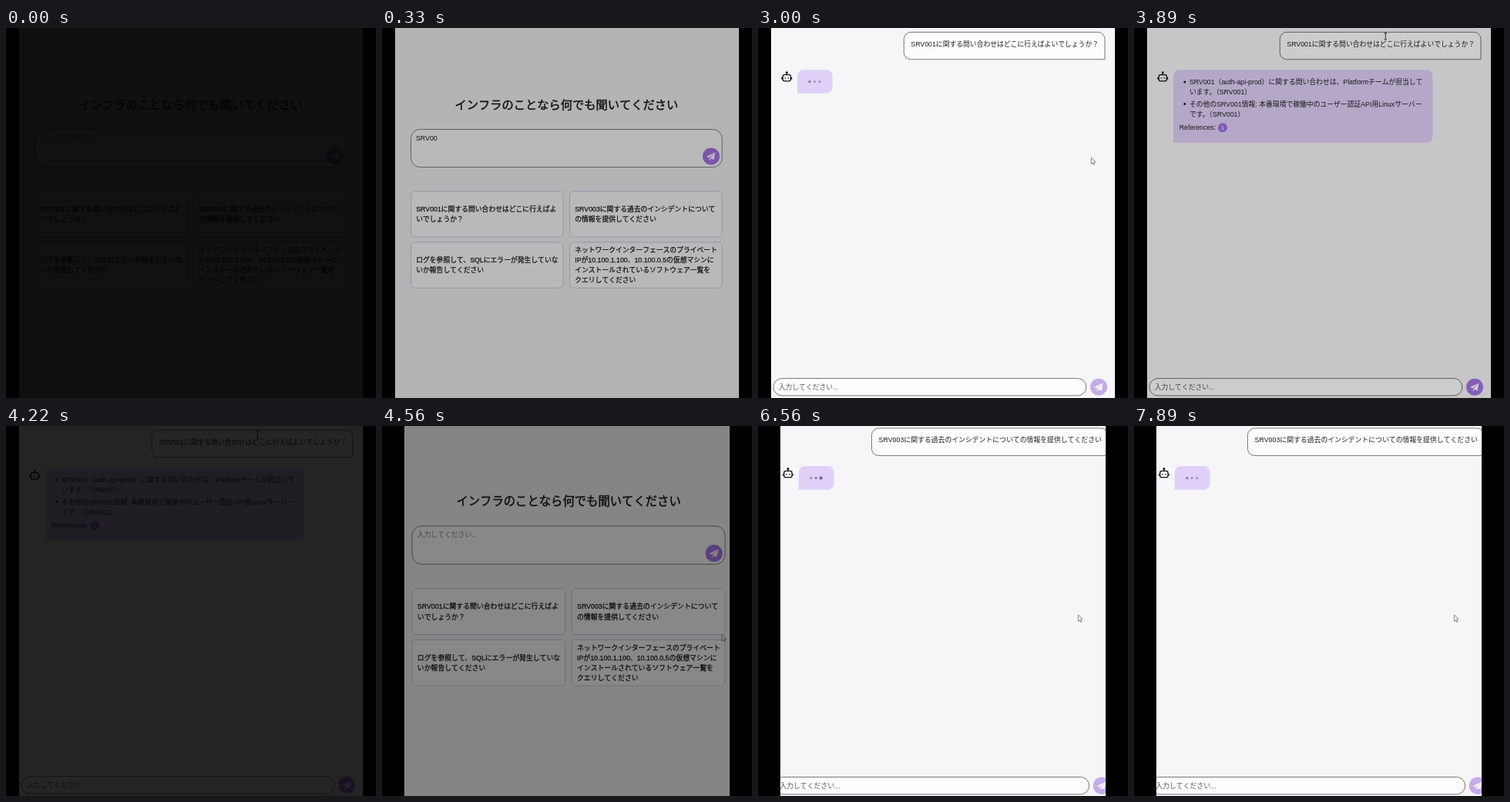
An HTML page with a canvas for the animation above (8 s loop, 480 px wide and 480 px high).

```html
<!DOCTYPE html>
<html lang="ja">
<head>
<meta charset="utf-8">
<title>Infra chat</title>
<style>
html, body { margin: 0; width: 100%; height: 100%; overflow: hidden; background: #000; }
canvas { display: block; width: 480px; height: 480px; }
</style>
</head>
<body>
<canvas id="stage"></canvas>
<script>
const LOOP = 8000, EM = 8.8;
const FAMILY = '"Liberation Sans", "Noto Sans CJK JP", "Noto Sans CJK", sans-serif';
const BG = '#f6f6f8', PAPER = '#fdfdfd', INK = '#1c1c22', EDGE = '#55555b';
const LILAC = '#e0d0f7', PURPLE = '#a874ea', PALE = '#c5abea';

const Q1 = 'SRV001に関する問い合わせはどこに行えばよいでしょうか？';
const Q2 = 'SRV003に関する過去のインシデントについての情報を提供してください';
const HINT = '入力してください...';
const CARDS = [
  [37.5, 212, ['SRV001に関する問い合わせはどこに行えばよ', 'いでしょうか？']],
  [243.5, 212, ['SRV003に関する過去のインシデントについて', 'の情報を提供してください']],
  [37.5, 278, ['ログを参照して、SQLにエラーが発生していな', 'いか報告してください']],
  [243.5, 278, ['ネットワークインターフェースのプライベート', 'IPが10.100.1.100、10.100.0.5の仮想マシンに',
    'インストールされているソフトウェア一覧を', 'クエリしてください']]
];
// Each line: baseline, text, and a bracketed tail set half an em closer.
const ANSWER = [
  [73, 'SRV001（auth-api-prod）に関する問い合わせは、Platformチームが担当して', ''],
  [86, 'います。', '（SRV001）'],
  [101.5, 'その他のSRV001情報: 本番環境で稼働中のユーザー認証API用Linuxサーバー', ''],
  [114.5, 'です。', '（SRV001）']
];

const CHAT1 = 1150, ANSWER_FROM = 3060, ANSWER_TO = 3480;
const CUT = 4293, FADE = 500, CHAT2 = 5060;

const canvas = document.getElementById('stage');
const c = canvas.getContext('2d');
const dpr = window.devicePixelRatio || 1;
canvas.width = canvas.height = 480 * dpr;

const clamp = v => Math.max(0, Math.min(1, v));
const span = (t, a, b) => clamp((t - a) / (b - a));
const ease = p => p * p * (3 - 2 * p);
const mix = (a, b, p) => a + (b - a) * p;

// "heavy" thickens the strokes, for a medium weight.
function text(s, x, y, color = INK, size = EM, heavy = 0) {
  c.font = `${size}px ${FAMILY}`;
  c.fillStyle = color;
  c.fillText(s, x, y);
  if (heavy) {
    c.strokeStyle = color;
    c.lineWidth = heavy;
    c.lineJoin = 'round';
    c.strokeText(s, x, y);
  }
}

function widthOf(s) {
  c.font = `${EM}px ${FAMILY}`;
  return c.measureText(s).width;
}

function box(x, y, w, h, r, fill, stroke, line = 0.8) {
  c.beginPath();
  c.roundRect(x, y, w, h, r);
  c.fillStyle = fill;
  c.fill();
  if (stroke) {
    c.strokeStyle = stroke;
    c.lineWidth = line;
    c.stroke();
  }
}

function disc(x, y, r, fill) {
  c.beginPath();
  c.arc(x, y, r, 0, Math.PI * 2);
  c.fillStyle = fill;
  c.fill();
}

function poly(points, fill) {
  c.beginPath();
  points.forEach(([x, y]) => c.lineTo(x, y));
  c.closePath();
  c.fillStyle = fill;
  c.fill();
}

function sendButton(x, y, color) {
  disc(x, y, 11, color);
  c.save();
  c.translate(x, y);
  poly([[5.6, -5.4], [-6, 0.2], [-2.6, 1.8]], '#fff');
  poly([[5.6, -5.4], [-1.7, 2.3], [3.4, 4.6]], '#fff');
  poly([[-2.3, 2.6], [-2.1, 5.6], [-0.2, 3.6]], '#fff');
  c.restore();
}

function bot() {
  c.strokeStyle = '#111';
  c.lineWidth = 1.3;
  c.beginPath();
  c.roundRect(32.2, 60.6, 10.2, 8.2, 2.2);
  c.moveTo(37.3, 60.4);
  c.lineTo(37.3, 58.6);
  c.moveTo(31, 64);
  c.lineTo(31, 66.4);
  c.moveTo(43.6, 64);
  c.lineTo(43.6, 66.4);
  c.stroke();
  disc(37.3, 57.7, 1.5, '#111');
  disc(35.3, 65, 0.8, '#111');
  disc(39.3, 65, 0.8, '#111');
}

function home(typed) {
  text('インフラのことなら何でも聞いてください', 94.5, 105.3, INK, 15.25, 0.45);
  box(37.5, 131.5, 403.7, 49, 12, PAPER, '#66666c');
  text(typed || HINT, 44, 145.6, typed ? INK : '#77777c');
  sendButton(427, 166.5, PURPLE);
  for (const [x, y, lines] of CARDS) {
    box(x, y, 197.6, 59.2, 5, PAPER, '#cdbcea');
    const first = y + 32.8 - (lines.length - 1) * 6.5;
    lines.forEach((s, i) => text(s, x + 6.7, first + i * 13, INK, EM, 0.25));
  }
}

function dots(age) {
  box(51, 54.3, 45.6, 30.5, [8, 8, 8, 0], LILAC);
  for (let i = 0; i < 3; i++) {
    const p = (age + 320 - i * 160) % 1000 / 1000;
    const k = p < 0.4 ? ease(p / 0.4) : 1 - ease(clamp((p - 0.4) / 0.4));
    disc(67 + i * 6.4, 69.6, mix(1.3, 2.3, k), `rgba(70,58,95,${mix(0.55, 0.7, k)})`);
  }
}

function answer(p) {
  const total = ANSWER.reduce((n, a) => n + a[1].length + a[2].length, 0);
  let left = Math.ceil(total * p), right = 80, bottom = 85;
  const shown = [];
  ANSWER.forEach(([y, head, tail], i) => {
    if (left <= 0) return;
    const a = head.slice(0, left);
    const b = tail.slice(0, Math.max(0, left - head.length));
    left -= head.length + tail.length;
    right = Math.max(right, 72 + widthOf(a + b));
    bottom = Math.max(bottom, y + 10);
    shown.push([i, y, a, b]);
  });
  const done = p >= 1;
  box(51, 54.3, done ? 336.5 : Math.min(336.5, right - 38), done ? 94.4 : bottom - 54.3, [8, 8, 8, 0], LILAC);
  for (const [i, y, a, b] of shown) {
    if (i % 2 === 0) disc(65.8, y - 3, 1.5, INK);
    text(a, 72, y);
    if (b) text(b, 72 + widthOf(a) - EM / 2, y);
  }
  if (done) {
    text('References:', 58.7, 131.8);
    disc(115, 129.2, 6, '#9f6fe6');
    text('1', 113, 131.8, '#fff', 7.4);
  }
}

function chat(question, age, progress) {
  const x = 442 - widthOf(question);
  box(x - 9, 5.4, 459 - x, 35.3, [9, 9, 0, 9], PAPER, EDGE);
  text(question, x, 23.6);
  bot();
  if (progress > 0) answer(progress);
  else dots(age);
  box(20, 454.6, 405.8, 22.3, 11, PAPER, EDGE);
  text(HINT, 26.7, 469, '#55555a');
  sendButton(442, 465.8, progress >= 1 ? PURPLE : PALE);
}

function outline(points, x, y) {
  c.save();
  c.translate(x, y);
  poly(points, '#fff');
  c.strokeStyle = '#55555b';
  c.lineWidth = 0.7;
  c.lineJoin = 'round';
  c.stroke();
  c.restore();
}

function arrow(x, y) {
  outline([[0.4, 0], [0.4, 8.4], [2.3, 6.7], [3.5, 9.5], [4.8, 8.9], [3.6, 6.2], [6.1, 6]], x, y);
}

function hand(x, y) {
  outline([[0, 0], [1.3, 0], [1.5, 3.5], [4.8, 4.3], [4.9, 7], [4, 9.4], [0.3, 9.4], [-1.9, 6], [-1.3, 5.2], [0, 6.2]], x, y);
}

function beam(x, y) {
  c.strokeStyle = '#222';
  c.lineWidth = 0.9;
  c.beginPath();
  c.moveTo(x - 1.7, y - 4);
  c.lineTo(x + 1.7, y - 4);
  c.moveTo(x, y - 4);
  c.lineTo(x, y + 4);
  c.moveTo(x - 1.7, y + 4);
  c.lineTo(x + 1.7, y + 4);
  c.stroke();
}

function clipTo(x, w) {
  c.beginPath();
  c.rect(x, 0, w, 480);
  c.clip();
  c.fillStyle = BG;
  c.fillRect(x, 0, w, 480);
}

function firstClip(t) {
  clipTo(17, 446);
  if (t < CHAT1) {
    home(Q1.slice(0, Math.floor(Q1.length * span(t, 250, 700))));
    const p = ease(span(t, 620, 860));
    if (p >= 1) hand(432.6, 168);
    else if (p > 0) arrow(mix(385, 432.5, p), mix(215, 168, p));
  } else {
    chat(Q1, t - CHAT1, span(t, ANSWER_FROM, ANSWER_TO));
    if (t < 3840) arrow(432, 168);
    else beam(326.3, 10.8);
  }
}

function secondClip(t) {
  clipTo(29, 422);
  c.save();
  c.translate(1.4, -2.6);
  c.scale(1.0055, 1.0075);
  if (t < CHAT2) home('');
  else chat(Q2, t - CHAT2, 0);
  c.restore();
  const p = ease(span(t, 4600, 4960));
  arrow(mix(440.5, 415, p), mix(270.5, 245, p));
}

function draw(t) {
  c.setTransform(dpr, 0, 0, dpr, 0, 0);
  c.fillStyle = '#000';
  c.fillRect(0, 0, 480, 480);
  c.save();
  if (t < CUT) firstClip(t);
  else secondClip(t);
  c.restore();
  const light = t < 1000 ? span(t, -33, 467) : Math.min(1, Math.abs(t - CUT) / FADE);
  if (light < 1) {
    c.fillStyle = `rgba(0,0,0,${1 - light})`;
    c.fillRect(0, 0, 480, 480);
  }
}

const start = performance.now();
function tick() {
  draw((performance.now() - start) % LOOP);
  requestAnimationFrame(tick);
}
tick();
</script>
</body>
</html>
```
